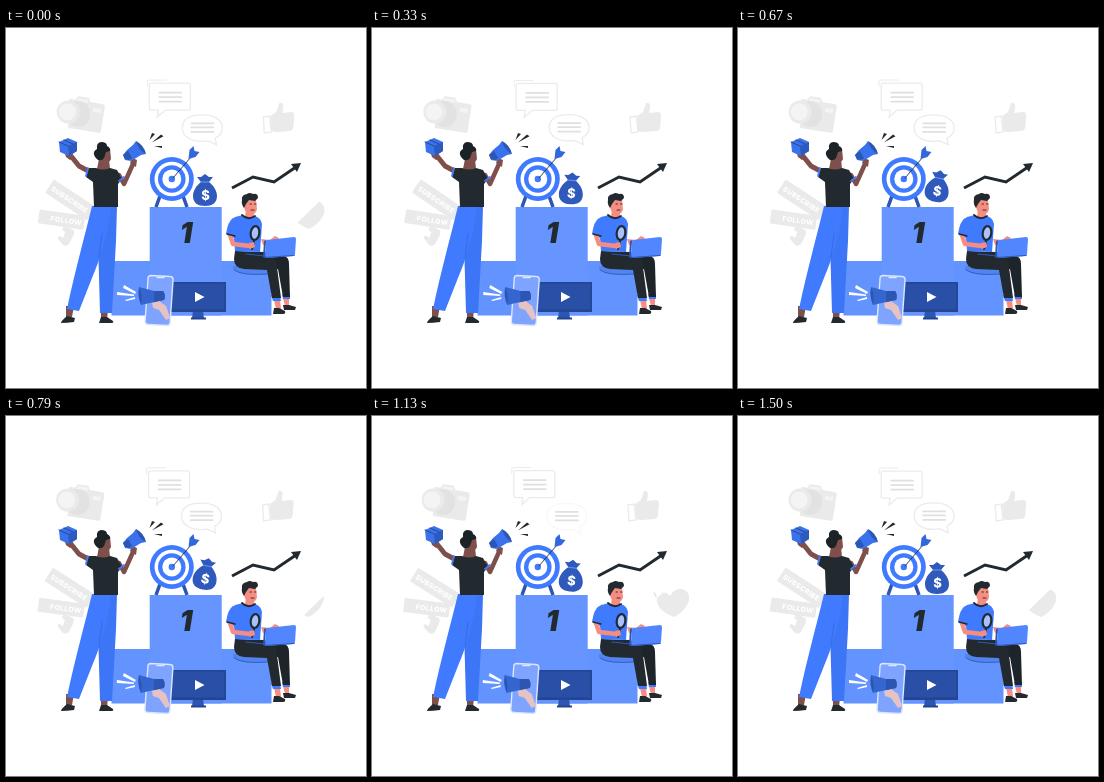
An HTML page that plays this animation: 360x360 px, repeating every 1.54 s.

```html
<!DOCTYPE html>
<html lang="en">
<head>
<meta charset="utf-8">
<title>Podium</title>
<style>
html, body { margin: 0; width: 100%; height: 100%; overflow: hidden; background: #fff; }
svg { display: block; width: 100vw; height: 100vh; }
text { font-family: Inter, sans-serif; font-weight: 800; }
.blue { fill: #407bff; }
.light { fill: #6695ff; }
.deep { fill: #2d56b3; }
.dark { fill: #222a30; }
.brown { fill: #7f4f4b; }
.skin { fill: #f58d80; }
.grey { fill: #eaeaea; }
.pale { fill: #f4f4f4; }
.line { fill: none; stroke-linecap: round; stroke-linejoin: round; }
.outline { fill: #fff; stroke: #ebebeb; stroke-width: 1.3; }
</style>
</head>
<body>
<svg viewBox="0 0 360 360">
  <defs>
    <clipPath id="reveal"><rect id="window" x="-40" y="0" width="80" height="60" transform="rotate(-44)"/></clipPath>
  </defs>

  <!-- floating icons -->
  <g data-x=".9">
    <g transform="rotate(9 76 87)">
      <path class="grey" d="M61 73h6l2-4h11l2 4h13q2 0 2 2v25q0 2-2 2H64z"/>
      <path class="pale" d="M69 71h11v3H69zM86 78h8v4h-8z"/>
    </g>
    <ellipse cx="72" cy="86" rx="12" ry="13" fill="#e2e2e2"/>
    <circle class="grey" cx="62" cy="84" r="11.5"/>
    <circle class="pale" cx="61" cy="84" r="8.5"/>
  </g>

  <g data-x="1.2" data-y=".4">
    <path class="line" stroke="#ebebeb" d="M141 58v-5q0-1 1-1h18"/>
    <path class="outline" d="M145 55h37q2 0 2 2v23q0 2-2 2h-23l-8 7 1-7h-7q-2 0-2-2V57q0-2 2-2z"/>
    <path class="line" stroke="#e0e0e0" stroke-width="1.8" d="M153 64.500h22M153 69h22M153 73.500h22"/>
  </g>

  <g data-x="1.2" data-y="-.4">
    <path id="bubble" class="outline" d="M196 87c12 0 20 5 20 13 0 5-3 8-7 10l1 7-8-4c-16 2-26-4-26-13s8-13 20-13z"/>
    <path class="line" stroke="#e0e0e0" stroke-width="1.8" d="M185 95.500h22M185 99.500h22M185 104h22"/>
  </g>

  <g data-x="1.1">
    <path class="outline" d="M257 89l6-1 2 16-7 1z"/>
    <path class="grey" d="M264 88l6-4 3-9q4-1 4 4l-1 6 9-1q3 0 3 3l-1 13q-1 3-4 3l-12 1q-4 0-6-1z"/>
  </g>

  <g data-x=".7" data-spin="1" data-cx="62" data-cy="185">
    <g transform="translate(47.500 151.500) rotate(33)">
      <rect class="grey" width="50" height="16" rx="1"/>
      <text x="3" y="10.800" font-size="7" letter-spacing=".3" fill="#fff">SUBSCRIBE</text>
    </g>
    <g transform="translate(33.500 181.500) rotate(8)">
      <rect class="grey" width="46" height="14" rx="1"/>
      <text x="12" y="9.800" font-size="7" letter-spacing=".3" fill="#fff">FOLLOW</text>
    </g>
    <path class="grey" d="M56 202l2-5q2-1 3 2l6 3q2 2 0 6l-4 8q-3 3-6 1l-5-6q-1-3 2-3l3 2 2-6z"/>
  </g>

  <g transform="translate(301 187)">
    <g data-x="1">
      <path class="grey" clip-path="url(#reveal)" d="M2 14C-9 10-16 3-15-4c1-7 9-9 13-3C2-15 11-16 15-11c6 7-1 19-13 25z"/>
      <path id="spark" class="line" stroke="#e6e6e6" stroke-width="1.500" d="M-18-10q2 1 2 4"/>
    </g>
  </g>

  <!-- podium -->
  <path fill="#6293ff" d="M105.500 233h160v54.500h-160z"/>
  <path class="light" d="M143.700 179h72v108.500h-72z"/>
  <path fill="#5283ee" d="M227 238h37v8q-30 3-37-5z"/>
  <path class="line" stroke="#2d56b3" stroke-width=".8" d="M228 242q8 6 34 4"/>
  <text class="dark" x="180" y="215" font-size="28" font-style="italic" text-anchor="middle" style="font-weight:900">1</text>

  <!-- target -->
  <path class="line" stroke="#2d56b3" stroke-width="3.500" style="stroke-linecap:butt" d="M154 168l-4 11M177 168l4 11"/>
  <circle class="blue" cx="165.800" cy="151" r="22"/>
  <circle cx="165.800" cy="151" r="17.300" fill="#fff"/>
  <circle class="blue" cx="165.800" cy="151" r="13.800"/>
  <circle cx="165.800" cy="151" r="9.500" fill="#fff"/>
  <circle class="blue" cx="165.800" cy="151" r="3.200"/>
  <path class="line" stroke="#263238" stroke-width=".9" d="M167 150l18-21"/>
  <path fill="#3368dc" d="M182.500 131l1-9 4-4 1 5 5 1-4 5z"/>

  <g id="bag">
    <path fill="#2f5abc" d="M195 154l-4-5 4 0 4-3 4 3 4 0-4 5c5 4 8 9 8 14 0 7-5 10-12 10s-12-3-12-10c0-5 3-10 8-14z"/>
    <path class="line" stroke="#6695ff" d="M195 154h8"/>
    <text x="199.500" y="171.500" font-size="13" text-anchor="middle" fill="#fff">$</text>
  </g>

  <!-- growth line -->
  <path class="line" stroke="#222a30" stroke-width="3" style="stroke-linecap:butt;stroke-linejoin:miter" d="M226 160l21-11 21 5 22-15"/>
  <path class="dark" d="M285 136l10-1-4 9z"/>

  <!-- monitor -->
  <path class="deep" d="M187 283h10l1 7h-12z"/>
  <path fill="#234592" d="M185 289.500h15v2h-15zM164 254h56v30h-56z"/>
  <path fill="#2a4fa6" d="M165.500 255.500h53v26h-53z"/>
  <path fill="#fff" d="M189 264l9.500 5-9.500 5z"/>

  <!-- phone -->
  <g data-x=".25">
    <path d="M145 247.500l19 1q3 0 3 3l-3 43q0 3-3 3l-19-1q-3 0-3-3l3-43q0-3 3-3z" fill="#7ea4ff" stroke="#dce7ff" stroke-width="1.400"/>
    <path class="line" stroke="#dce7ff" stroke-width="1.500" d="M151 249.500h7"/>
    <path fill="#e6c3c2" d="M146 275l7-2 7 5 4 12-4 2-7-10-6-2z"/>
    <path fill="#3566cf" d="M133 259l15 4 9 0q3 4 1 9l-10 2-13 3z"/>
    <path class="deep" d="M133 259q4 8 2 18-4-9-2-18zM148 263l9 0q3 4 1 9l-10 2z"/>
    <path fill="#fff" d="M118 257l12 7-1 2-12-6zM111 264l17 2.500v1.500l-17-1zM119 272l10-3 0 2-9 2z"/>
  </g>

  <!-- standing man -->
  <path class="brown" d="M60 278h8l-2 11h-6zM95 282h7l-1 9h-6z"/>
  <path class="dark" d="M61 288l8 2-1 4q-7 1-13 1 0-2 6-7zM95 289h6l6 4q1 2-2 2H93z"/>
  <path fill="#3c75f5" d="M88 178h23l-1 35-4 72H94l-2-72z"/>
  <path class="blue" d="M88 178h17c-2 26-11 53-19 72l-13 33-12-2c8-38 17-70 25-103z"/>
  <path class="line" stroke="#3768d6" stroke-width=".8" d="M96 206l-3 24"/>
  <path class="line" stroke="#7f4f4b" stroke-width="5" d="M86 145l-13-7-8-10"/>
  <path class="line" stroke="#7f4f4b" stroke-width="4.500" d="M113 147l5 9 9-20"/>
  <path class="brown" d="M58 123l7 1 3 6-4 2-4-3zM124 135l2-5 5 2-1 7z"/>
  <path class="brown" d="M93 131h10l1 10q-7 4-13 0z"/>
  <path class="dark" d="M90 140q7 3 14 0l7 2 5 9-4 5 0 23H88l-1-25-7-5 3-9z"/>
  <path class="line" stroke="#407bff" stroke-width="1.800" d="M82 140l-2 8M118 149l-5 4"/>
  <path class="brown" d="M97 121h7l1 10q-2 5-8 4z"/>
  <path fill="#1b2327" d="M91 121q-1-6 4-7 6 0 6 4 4 2 3 5l-4 1-2 6q-2 3-6 2-5-4-4-8 1-2 3-3z"/>
  <path fill="#3a72ea" d="M53 114l9-4 9 4v9l-8 5-9-4z"/>
  <path fill="#2d5abf" d="M62 118l9-4v9l-8 5z"/>
  <path class="line" stroke="#254a9c" d="M53 114l9 4M58 112l9 4"/>
  <path fill="#3a72ee" d="M130 113l10 13-5 1-10 6-6-1-2-5 4-5 6-5z"/>
  <path class="deep" d="M130 113q8 4 10 13-8-4-10-13zM117 127l5-4 4 7-3 2-4-1z"/>
  <path class="dark" d="M143.500 112l2.500-7 3 1zM146 114.500l9-8 2.500 1.800zM148 118l8 0 0 2z"/>

  <!-- seated man -->
  <path class="skin" d="M268 272h6l1 9h-5zM277 270h6v8h-4z"/>
  <path class="dark" d="M268 280l5 0 6 3q1 3-2 3h-10zM277 277h6l7 2-1 3h-11z"/>
  <path class="blue" d="M265 267h9l1 6h-8zM276 266h8v5h-7z"/>
  <path fill="#1d252a" d="M256 224l22 4q5 1 5 8l1 33h-7l-5-28-20-1z"/>
  <path class="dark" d="M229 223l29 1 9 6q4 2 4 9l4 31h-9l-5-28-23-1q-10-1-10-10z"/>
  <path class="skin" d="M240 181h8v9q-4 3-9-1z"/>
  <path class="blue" d="M237 187q5 5 12 1 6 2 7 8l-2 28-25-1-1-13-7-3q2-15 8-18z"/>
  <path class="line" stroke="#222a30" stroke-width="1.800" d="M236 187q6 6 13 1"/>
  <path class="skin" d="M238 172q6-4 12 0l1 9q-1 5-5 5-7 0-8-7z"/>
  <path class="dark" d="M236 172q-1-5 5-6 2-2 6 0 5-1 5 4l-3 3-6-1-3 4-2 4q-3-4-2-8z"/>
  <path class="line" stroke="#222a30" stroke-width=".9" d="M244 176h1.500M248.500 176h1.500M245 182h3"/>
  <path class="line" stroke="#f58d80" stroke-width="4.500" d="M224 207l3 9 17 2"/>
  <path class="blue" d="M220 206q2-13 7-16l5 5-3 13z"/>
  <path class="line" stroke="#222a30" stroke-width="1.300" d="M221 206l8 2"/>
  <path class="line" stroke="#222a30" stroke-width="2" d="M248 213l-2 8"/>
  <ellipse cx="249" cy="205" rx="4.300" ry="7" transform="rotate(8 249 205)" fill="#a9c2ff" stroke="#222a30" stroke-width="2.200"/>
  <path class="skin" d="M243 215l5-1 1 5-5 2zM255 211l9 1 5-4 4 2-4 5-12 2z"/>
  <path class="deep" d="M258 213l2-1-1 18-2-1z"/>
  <path d="M261 212l27-3q2 0 2 2l-1 15q0 2-2 2l-26 2q-2 0-2-2l1-14q0-2 1-2z" fill="#5186ff"/>
  <path class="line" stroke="#2d56b3" stroke-width="1.200" d="M240 226l19 2 0 1.500 29-2"/>
</svg>
<script>
const LOOP = 1540, STEPS = 37, LEAD = 70;
const $ = id => document.getElementById(id);
const floaters = [...document.querySelectorAll("[data-x]")];
// [time in ms, visible share of the heart]
const heartKeys = [[0, .48], [200, 0], [735, 0], [790, .22], [1000, 1], [1250, .75], [1500, .5], [LOOP, .48]];

function sample(keys, t) {
  const i = keys.findIndex(key => key[0] > t);
  const [t0, a] = keys[i - 1], [t1, b] = keys[i];
  return a + (b - a) * (t - t0) / (t1 - t0);
}

function draw(now) {
  const t = Math.floor((now + 2) % LOOP / LOOP * STEPS) / STEPS * LOOP;
  const turn = 2 * Math.PI / LOOP;
  const sway = Math.sin((t + LEAD) * turn);
  const lift = (1 - Math.cos(t * turn)) / 2;
  for (const el of floaters) {
    const { x, y = 0, spin = 0, cx = 0, cy = 0 } = el.dataset;
    el.setAttribute("transform", `translate(${x * sway} ${y * sway}) rotate(${spin * sway} ${cx} ${cy})`);
  }
  $("bag").setAttribute("transform", `translate(0 ${-4.2 * lift}) rotate(${11 * lift} 199 166)`);
  const shown = sample(heartKeys, t);
  $("window").setAttribute("y", 14 - 32 * shown);
  $("spark").style.opacity = shown > .6 ? 1 : 0;
  $("bubble").style.strokeOpacity = sway < -.6 ? .35 : 1;
  requestAnimationFrame(draw);
}
draw(performance.now());
</script>
</body>
</html>
```
